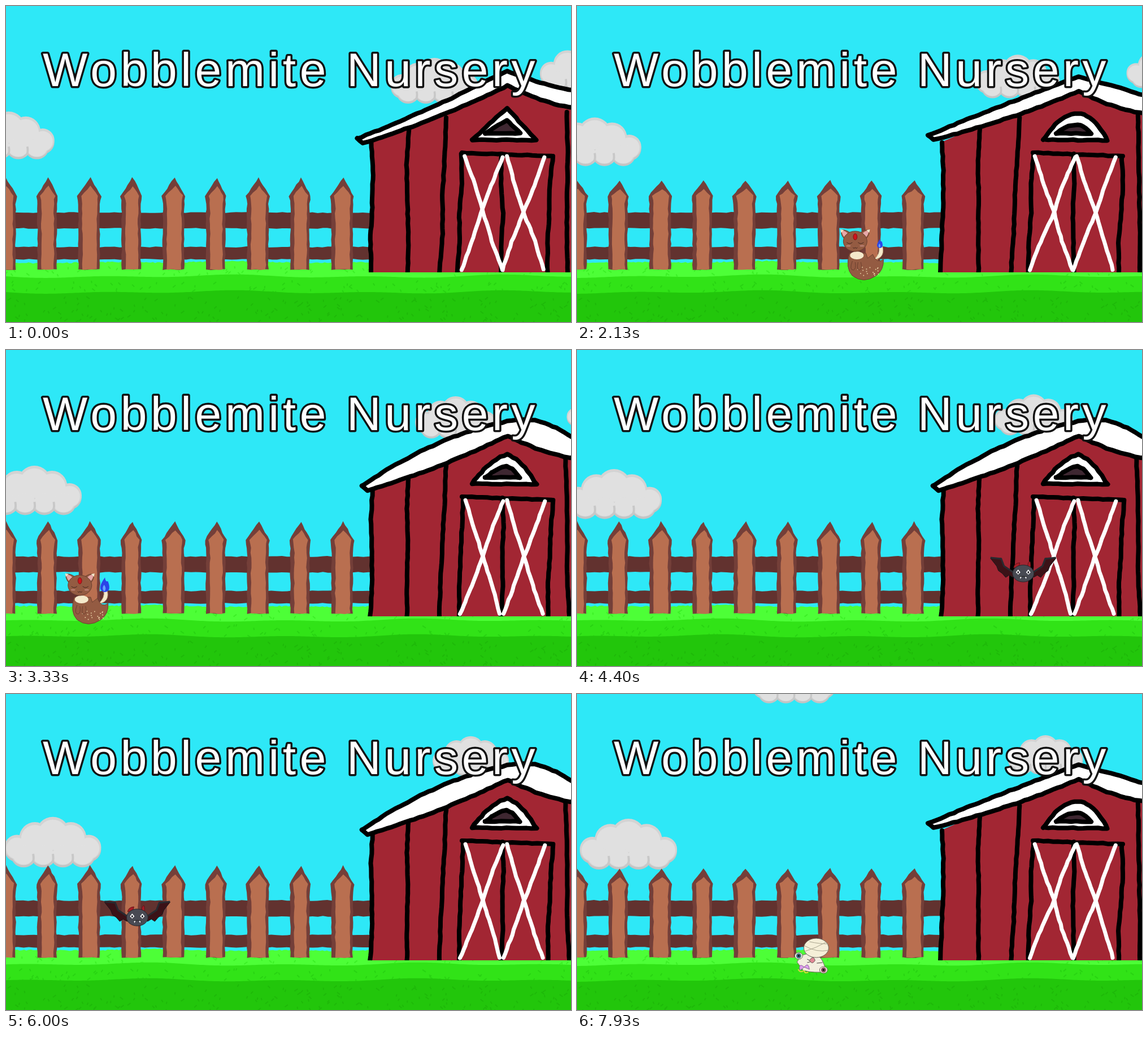
Animation, 1000 px wide and 560 px high, one loop 8 s. Source, as an HTML page with a canvas:

```html
<!DOCTYPE html>
<html lang="en">
<head>
<meta charset="utf-8">
<title>Wobblemite Nursery</title>
<style>
  html, body { margin: 0; width: 100%; height: 100%; overflow: hidden; background: #2ee8f7; }
  canvas, svg { position: absolute; left: 0; top: 0; width: 1000px; height: 560px; }
  text {
    font: 84px "Liberation Sans", Arial, sans-serif; letter-spacing: 6.6px;
    fill: #fff; stroke: #111; stroke-width: 7px; stroke-linejoin: round; paint-order: stroke;
  }
</style>
</head>
<body>
<canvas id="stage" width="1000" height="560"></canvas>
<svg viewBox="0 0 1000 560"><text x="65" y="142">Wobblemite Nursery</text></svg>
<script>
const W = 1000, H = 560, LOOP = 8000, HOLD = 400, STEP = 1000 / 15, LAST = 113;
const ctx = document.getElementById('stage').getContext('2d');

function random(seed) {
  return () => {
    seed = (seed * 1664525 + 1013904223) >>> 0;
    return seed / 4294967296;
  };
}

const mix = (a, b, u) => a + (b - a) * u;

// ---- Scenery: one drawing redrawn three times with a shaky hand ----
const looks = [
  { eave: [622, 235], apex: 115, bulge: -4, window: { top: 181, bulge: 0 } },
  { eave: [621, 229], apex: 125, bulge: 1, window: { top: 190, bulge: 12 } },
  { eave: [630, 241], apex: 126, bulge: 16, window: { top: 185, bulge: 9 } }
];

// Path through the points, each segment split and its points jittered.
function rough(pts, amp, rnd, closed, gap = 9) {
  const path = new Path2D(), ends = closed ? [...pts.slice(1), pts[0]] : pts.slice(1);
  path.moveTo(...pts[0]);
  ends.forEach(([x, y], i) => {
    const [px, py] = pts[i], parts = Math.ceil(Math.hypot(x - px, y - py) / gap);
    const shake = () => (rnd() - .5) * 2 * amp;
    for (let j = 1; j <= parts; j++)
      path.lineTo(mix(px, x, j / parts) + shake(), mix(py, y, j / parts) + shake());
  });
  return path;
}

// Two sides rising to a peak, each bowed outwards by bulge.
function arch(left, peak, right, bulge) {
  const side = (a, b) => [0, .2, .4, .6, .8, 1].map(u =>
    [mix(a[0], b[0], u), mix(a[1], b[1], u) - bulge * 4 * u * (1 - u)]);
  return [...side(left, peak), ...side(peak, right)];
}

function drawGrass(g, top, wave, color, blade, depth, seed) {
  const rnd = random(seed);
  g.fillStyle = color;
  g.beginPath();
  g.moveTo(0, H);
  for (let x = 0; x <= W; x += 4) g.lineTo(x, top + wave(x));
  g.lineTo(W, H);
  g.fill();
  g.strokeStyle = blade;
  g.lineWidth = 2;
  g.beginPath();
  for (let i = 0; i < depth * 4; i++) {
    const x = rnd() * W, y = top + 7 + rnd() * depth;
    g.moveTo(x, y);
    g.lineTo(x + rnd() * 12 - 6, y + 4);
  }
  g.stroke();
}

function drawFence(g, state, rnd) {
  const plank = (color, pts) => {
    g.fillStyle = color;
    g.fill(rough(pts, .9, rnd, true));
  };
  const post = (color, x, half, tip, shoulder) => plank(color, [
    [x - half, 467], [x - half, shoulder + 14], [x - half - 2, shoulder], [x + 2, tip],
    [x + half + 2, shoulder], [x + half, shoulder + 14], [x + half, 467]
  ]);
  for (const [top, bottom] of [[366, 394], [427, 449]])
    plank('#62322f', [[-5, top], [650, top], [650, bottom], [-5, bottom]]);
  for (let i = 0; i < 9; i++) {
    const x = -2 + 74.6 * i, half = i % 2 ? 17 : 19, tip = state === 1 ? 309 : 304;
    post('#743f39', x, half, tip, 337);
    post('#b96f50', x + 1, half - 6, tip + 15, 336);
  }
}

function drawBarn(g, { eave, apex, bulge, window }, rnd) {
  const outline = (pts, fill) => {
    const path = rough(pts, .7, rnd, true);
    g.fillStyle = fill;
    g.fill(path);
    g.stroke(path);
  };
  const strand = (x0, y0, x1, y1) => {
    const bent = [0, .25, .5, .75, 1].map(u => [mix(x0, x1, u) + (rnd() - .5) * 5, mix(y0, y1, u)]);
    g.stroke(rough(bent, .6, rnd));
  };
  const pen = (color, width) => { g.strokeStyle = color; g.lineWidth = width; };

  g.save();
  g.beginPath();
  g.rect(0, 0, W, 472);
  g.clip();
  g.lineJoin = g.lineCap = 'round';
  g.fillStyle = '#a22633';
  g.fill(rough([[648, 240], [646, 472], [1010, 472], [1010, 180], [888, 135]], 0, rnd, true));

  pen('#000', 8);
  strand(648, 242, 645, 472);
  strand(711, 218, 710, 472);
  strand(781, 198, 768, 472);
  strand(991, 188, 996, 472);
  strand(807, 262, 800, 472);
  strand(966, 266, 959, 472);
  strand(879, 262, 878, 472);
  g.stroke(rough([[807, 260], [966, 266]], .7, rnd));
  pen('#fff', 7);
  for (const x of [812, 886]) {
    strand(x, 266, x + 64, 467);
    strand(x + 68, 268, x - 8, 468);
  }

  pen('#000', 8);
  outline(arch([825, 237], [887, window.top], [939, 238], window.bulge), '#fff');
  outline(arch([848, 226], [886, window.top + 21], [910, 226], window.bulge / 3), '#3e2731');
  const under = arch([eave[0] + 10, eave[1] + 8], [888, apex + 26], [1012, apex + 67], -6);
  outline([...arch(eave, [887, apex], [1012, apex + 36], bulge), ...under.reverse()], '#fff');
  g.restore();
}

const scenery = looks.map((look, state) => {
  const layer = document.createElement('canvas');
  layer.width = W;
  layer.height = H;
  const g = layer.getContext('2d'), rnd = random(71 + state * 29);
  const wave = size => x => size * (Math.sin(x / 37 + state * 2) + Math.sin(x / 83 + state));
  drawGrass(g, 453, x => wave(1)(x) + rnd() * 2, '#4dff37', '#3cf026', 16, 5 + state);
  drawFence(g, state, rnd);
  drawBarn(g, look, rnd);
  drawGrass(g, 479, wave(1.7), '#31e317', '#28d312', 20, 15 + state);
  drawGrass(g, 507, wave(1.7), '#22c60b', '#1eb909', 46, 25);
  return layer;
});

// ---- Small drawing helpers ----
function blob(x, y, rx, ry, fill, stroke) {
  ctx.beginPath();
  ctx.ellipse(x, y, rx, ry, 0, 0, 7);
  ctx.fillStyle = fill;
  ctx.fill();
  if (stroke) { ctx.strokeStyle = stroke; ctx.stroke(); }
}

function shape(d, fill, stroke) {
  const path = new Path2D(d);
  if (fill) { ctx.fillStyle = fill; ctx.fill(path); }
  if (stroke) { ctx.strokeStyle = stroke; ctx.stroke(path); }
}

function at(x, y, draw, scale = 1) {
  ctx.save();
  ctx.translate(x, y);
  ctx.scale(scale, scale);
  ctx.lineWidth = 1;
  draw();
  ctx.restore();
}

function mirrored(draw) {
  for (const side of [-1, 1]) {
    ctx.save();
    ctx.scale(side, 1);
    draw();
    ctx.restore();
  }
}

// ---- Moving parts ----
function drawCloud() {
  const layer = (dy, shrink, color) => {
    for (let i = 0; i < 5; i++) {
      const rise = Math.sin(Math.PI * i / 4);
      const r = 22 + 8 * rise - shrink;
      blob(22 + 32 * i, 54 - 24 * rise + dy, r, r, color);
    }
    for (let i = 0; i < 4; i++) blob(34 + 35 * i, 66 + dy, 22 - shrink, 20 - shrink, color);
  };
  layer(4, 0, '#c4c4c4');
  layer(0, 0, '#d3d3d3');
  layer(2, 3, '#e0e0e0');
  ctx.lineWidth = 4;
  for (let i = 0; i < 3; i++) shape(`M${45 + 35 * i} 84q9-2 6-18`, null, '#c8c8c8');
}

function drawFox(state) {
  const fur = '#945b42', edge = '#6b402f', cream = '#f4e9cb';
  shape('M19 53C32 52 38 42 32 26q-4-6-7-2q6 14-2 24z', cream, '#b99b78');
  at(28, 33, () => {
    shape('M0 0C-9-3-5-11 1-20Q2-13 5-15C9-5 7 0 0 0z', '#2a45e8');
    shape('M0-1q-4-4 0-9q4 6 0 9z', '#67a4ff');
  }, [1, .8, 1.3][state]);
  shape('M-25 42Q-33 68-20 82Q0 97 22 82Q36 72 35 53Q23 62 16 44L7 51L4 42z', fur, edge);
  const rnd = random(8);
  for (let i = 0; i < 24; i++) blob(-12 + rnd() * 40, 67 + rnd() * 15, 1, 1, '#e4c99f');
  shape('M-20 56q-6 16 2 16q5-2 3-14 M-10 58q-3 15 3 14q5-2 2-14', fur, edge);
  blob(-12, 46, 12, 7, cream);
  at(-15, 0, () => {
    mirrored(() => {
      shape('M6 8Q17-1 25 1Q26 10 18 18z', fur, edge);
      shape('M11 9Q18 1 24 2Q23 12 17 15z', '#e7a8a8');
      shape('M20 1l6-1l-1 6z', cream);
    });
    blob(0, 21, 21, 18, fur, edge);
    mirrored(() => {
      shape('M5 23q5 4 10 0', null, '#40251e');
      blob(12, 29, 4, 1.5, '#b87d70');
      shape('M0 32q2 3 4 0', null, '#40251e');
    });
    blob(0, 13, 3.4, 5.5, '#d0141b', '#7f1015');
  });
}

function drawBat(state) {
  const open = state === 2;
  mirrored(() => {
    shape(open ? 'M16-2L34-14L39-27L58-27L47-13L44-5L37 0L31 7L25 3L18 7z'
               : 'M16-3L31-12L41-22L47-4L43 8L38 2L33 7L28 3L18 6z', '#3b1217', '#17171b');
    ctx.lineWidth = 3;
    shape(open ? 'M16-1L34-13L39-26L58-28' : 'M16-2L31-11L42-22L46-8', null, '#292a30');
    ctx.lineWidth = 1;
  });
  shape('M-17-10Q-16-18-6-19L-8-11z M8-13Q8-21 12-21Q14-13 12-10z', '#a81d26', '#651117');
  blob(0, 0, 19, 15, '#484a53', '#25262b');
  mirrored(() => {
    shape('M9-7l4 5l-4 4l-4-4z', '#fff');
    blob(9, -2, 1.5, 2, '#202026');
    shape('M3 6h3l-1 4z', '#fff');
  });
  shape('M-7 6Q0 4 7 6', null, '#222');
}

function drawSnail() {
  const ink = '#69645a';
  shape('M-27 25Q-20 7 4 10Q20 16 24 42Q4 45-16 40z', '#f3eedf', ink);
  blob(7, 0, 22, 17, '#f5efd8', ink);
  shape('M-14-4Q8 9 29 4 M-5-11Q14-7 28-7 M-13 6Q7 0 24-10', null, '#aaa58f');
  shape('M-9 20l8 4l-8 2 M8 27l10-1', null, '#403c3a');
  shape('M-5 22Q2 12 5 22Q1 29-3 25z', '#e28896', ink);
  for (const [x, y, iris] of [[-24, 14, '#3f7186'], [20, 39, '#8a5060']]) {
    blob(x, y, 7, 6, '#f5efe3', ink);
    blob(x, y, 4.5, 4.5, iris);
    blob(x, y, 2, 2, '#171820');
  }
  ctx.lineWidth = 2;
  shape('M-25 38q4 7 10 2 M-14 40q0 6 7 3', null, '#d9dd3b');
  ctx.lineWidth = 1;
  shape('M-14 34Q-25 25-22 40zM-14 34Q-7 24-5 38z', '#dda2ec', '#8d5b9f');
}

// ---- Motion ----
const settle = u => Math.sin(Math.PI / 2 * u ** 1.1);
const steady = u => u;

// from and to are [x, y, scale]
const clouds = [
  { from: [-76, 187, .94], to: [5, 221, 1], ease: settle },
  { from: [681, 92, .9], to: [763, 73, .77], ease: settle },
  { from: [945, 70, .9], to: [1035, 92, .45], ease: settle },
  { from: [206, -135, .85], to: [311, -60, .85], ease: steady }
];

// Each enters from the right; time in seconds, drag slows it down.
const critters = [
  { draw: drawFox, y: 396, start: .4, speed: 320, drag: 4 },
  { draw: drawBat, y: 396, start: 3.81, speed: 466, drag: 42.3 },
  { draw: drawSnail, y: 450, start: 6.76, speed: 540, drag: 0 }
];

function render(now) {
  const frame = Math.max(0, Math.min(LAST, Math.floor((now % LOOP - HOLD + 4) / STEP)));
  const state = Math.floor(frame / 2.6 + .2) % 3;
  const seconds = (HOLD + frame * STEP) / 1000;
  ctx.fillStyle = '#2ee8f7';
  ctx.fillRect(0, 0, W, H);
  for (const { from, to, ease } of clouds) {
    const [x, y, scale] = from.map((v, i) => mix(v, to[i], ease(frame / LAST)));
    at(x, y, drawCloud, scale);
  }
  ctx.drawImage(scenery[state], 0, 0);
  for (const { draw, y, start, speed, drag } of critters) {
    const d = seconds - start;
    if (d >= 0) at(1050 - speed * d + drag * d * d, y, () => draw(state));
  }
}

let begin;
function loop(now) {
  begin ??= now;
  render(now - begin);
  requestAnimationFrame(loop);
}
requestAnimationFrame(loop);
</script>
</body>
</html>
```
